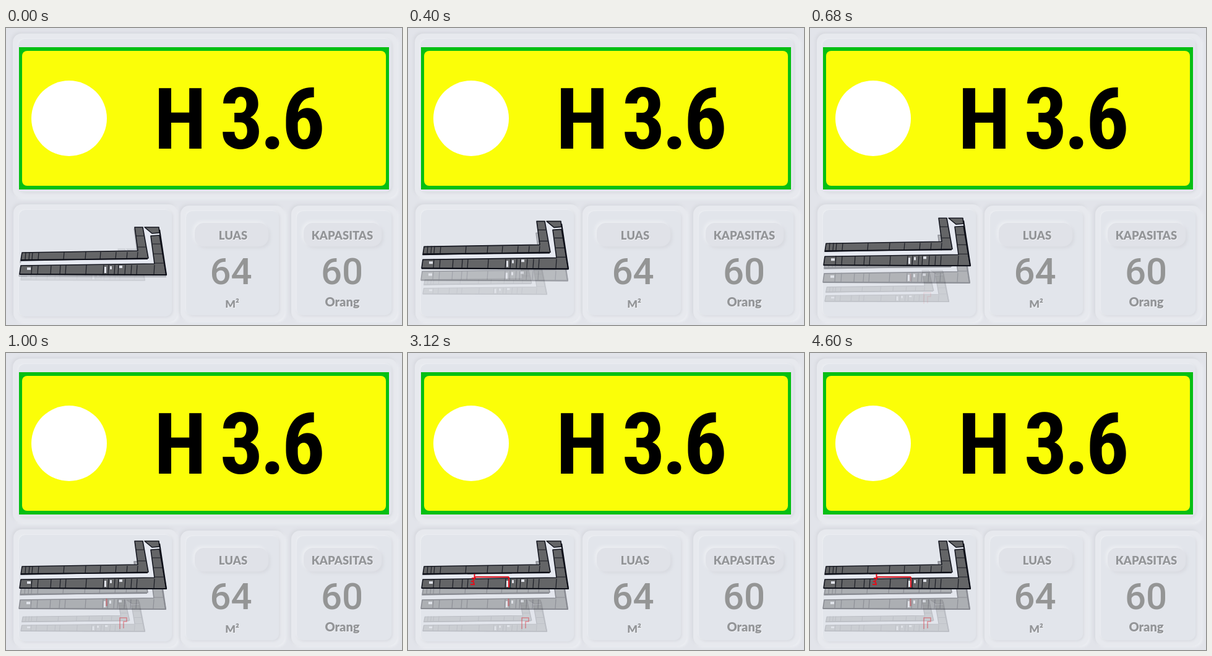
Recreate the animation shown at these times as an HTML page. Size 640 by 480 pixels, loop 5.12 s.

```html
<!DOCTYPE html>
<html lang="id">
<head>
<meta charset="utf-8">
<title>H 3.6</title>
<style>
  html, body { margin: 0; width: 100%; height: 100%; overflow: hidden; background: #e2e4ea; }
  .panel, svg { position: absolute; }
  .panel { border-radius: 14px; background: #e7e9ee; box-shadow: -2px -2px 5px #d6d8de, 2px 2px 4px #eff1f5; }
  .panel::before {
    content: ""; position: absolute; inset: 9px; border-radius: 10px; background: #e2e5eb;
    box-shadow: -1px -1px 3px #eff1f5, 1px 1px 4px #d2d4db;
  }
  .pill { position: absolute; border-radius: 15px; background: #e0e2e8; box-shadow: -3px -3px 5px #eceef2, 3px 3px 5px #d8dae0; }
  svg { left: 0; top: 0; }
  text { text-anchor: middle; }
  .room { font: 650 138px "Roboto Condensed", Roboto, sans-serif; font-stretch: 75%; letter-spacing: -5px; }
  .number { font: 500 60px Roboto, sans-serif; fill: #949595; }
  .label { font: 900 18.5px Lato, sans-serif; fill: #939598; filter: drop-shadow(1px 1px 0 #f1f2f5); }
  .route { fill: none; stroke: #e0101c; stroke-width: 2; }
</style>
</head>
<body>
<div class="panel" style="left:11px;top:9px;width:621px;height:265px"></div>
<div class="panel" style="left:12px;top:285px;width:265px;height:190px"></div>
<div class="panel" style="left:282px;top:287px;width:168px;height:186px"></div>
<div class="panel" style="left:461px;top:287px;width:171px;height:186px"></div>
<div class="pill" style="left:305px;top:315px;width:119px;height:38px"></div>
<div class="pill" style="left:481px;top:315px;width:126px;height:38px"></div>

<svg width="640" height="480" viewBox="0 0 640 480">
  <defs>
    <g id="floor" stroke-linejoin="round">
      <path fill="#e6e9f1" d="M26 345L213 342L208 304H247L260 381H22Z"/>
      <g id="walls" fill="#646567" stroke="#14161f" stroke-width="1.6"></g>
      <path id="dividers" fill="none" stroke="#1b1d25" stroke-width="1.2"/>
      <path fill="none" stroke="#0d0f18" stroke-width="2.2" d="M22 380L259 381L248 308M24 357L229 355"/>
      <path fill="#dfe1e8" d="M159 368h3v10h-3zM168 367h3v5h-3zM183 366h5v4h-5zM34 369h6v4h-6z"/>
    </g>
  </defs>

  <rect x="21" y="31" width="598" height="230" fill="#05bf13"/>
  <rect x="26" y="37" width="588" height="218" rx="8" fill="#fbfe08"/>
  <circle cx="102" cy="146" r="61" fill="#fff"/>
  <text class="room" x="375" y="195">H 3.6</text>

  <text class="label" x="367" y="342">LUAS</text>
  <text class="label" x="543.5" y="342">KAPASITAS</text>
  <text class="number" x="363.5" y="414">64</text>
  <text class="number" x="543" y="414">60</text>
  <text class="label" x="365.5" y="452" style="font-size:17.5px">M²</text>
  <text class="label" x="543.5" y="450" style="font-size:20px">Orang</text>

  <g id="lower"><use href="#floor" transform="translate(5.4 198.5) scale(.845 .66)"/></g>
  <g id="middle"><use href="#floor" x="-1" y="33"/></g>
  <g id="lowRoutes" class="route">
    <path stroke-width="1.5" d="M184 446V428H195V434H190V445"/>
    <path d="M162.5 397V409"/>
  </g>
  <use id="upper" href="#floor"/>
  <g class="route">
    <path id="stairs" d="M163 379V362"/>
    <path id="hall" d="M163 362H107.5V357"/>
    <path id="marker" d="M103 364H108L105 369H102M101 374H108M105 369L107 373"/>
  </g>
</svg>

<script>
const byId = id => document.getElementById(id);
const clamp = v => Math.max(0, Math.min(1, v));
const ramp = (t, from, to) => clamp((t - from) / (to - from));

// Two L-shaped room blocks around the corridor, and the wing head
byId("walls").innerHTML = [
  "26 345 213 342 208 304 221 304 230 354 24 358",
  "24 366 240 363 234 318 248 317 259 381 22 380",
  "224 304 247 304 248 313 236 314"
].map(points => `<polygon points="${points}"/>`).join("");

const cross = (xs, top, bottom) => xs.map(x => `M${x} ${top}L${x - 1} ${bottom}`).join("");
byId("dividers").setAttribute("d",
  cross([32, 38, 43, 53, 94, 129, 153, 178, 196, 213], 344, 356) +
  cross([42, 52, 73, 88, 97, 130, 158, 166, 176, 182, 193, 203, 212, 240], 365, 380) +
  "M210 318H224M213 336H227M237 331H250M239 347H253M241 362H256");

const shift = (id, y) => byId(id).setAttribute("transform", `translate(0 ${y})`);
const fade = (id, opacity) => byId(id).setAttribute("opacity", opacity);

function draw(now) {
  const t = Math.floor(now % 5120 / 40) * 40;
  const left = (1 - ramp(t, 0, 1000)) ** 1.5;
  shift("upper", 18 * left);
  shift("middle", -12 * left);
  shift("lower", -42 * left);
  fade("middle", .42 - .2 * left);
  fade("lower", .18 - .08 * left);
  fade("lowRoutes", .4 * ramp(t, 600, 1000));
  fade("stairs", ramp(t, 1680, 2160));
  fade("hall", ramp(t, 1720, 2520));
  fade("marker", ramp(t, 2920, 3120));
  requestAnimationFrame(draw);
}
draw(0);
</script>
</body>
</html>
```
